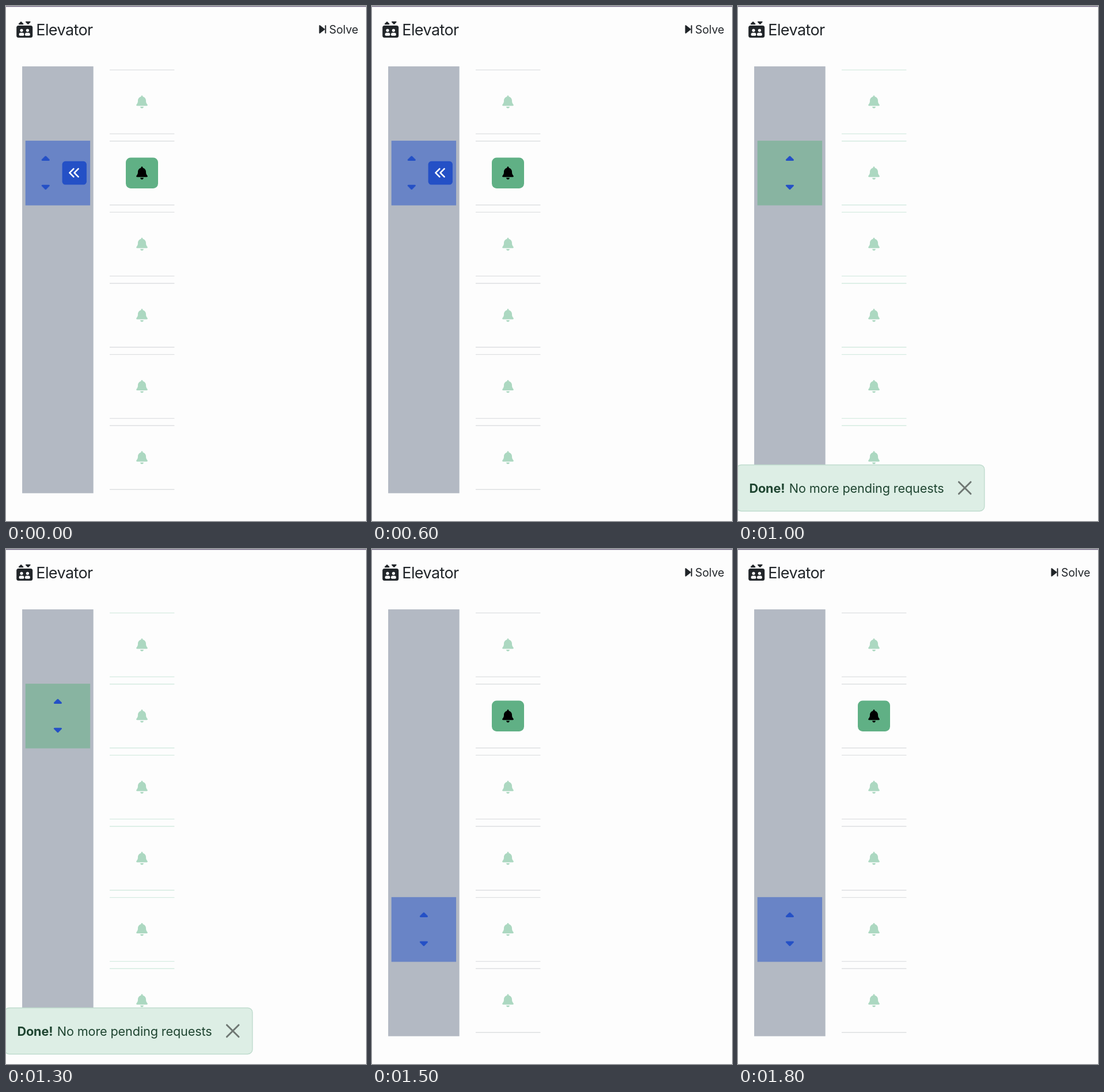
Write an HTML page that moves like this. It is 625x895 px and loops after 2000 ms.

```html
<!DOCTYPE html>
<html lang="en">
<head>
<meta charset="utf-8">
<title>Elevator</title>
<style>
html, body { margin: 0; width: 100%; height: 100%; overflow: hidden; background: #fdfdfd; }
svg { display: block; width: 625px; height: 895px; }
text { font-family: Inter, "Open Sans", sans-serif; fill: #212529; }

.car, .cab, .carets, .edge, .waiting, .opened, .done {
  animation: 2s step-end infinite;
}
.car { animation-name: travel; }
.cab { animation-name: tint; }
.carets { animation-name: center; }
.edge { animation-name: edge; }
.waiting { animation-name: waiting; }
.opened { animation-name: opened; }
.done { animation-name: done; }

@keyframes travel {
  0% { transform: none; }
  75%, 100% { transform: translateY(370.9px); }
}
@keyframes tint {
  0%, 75%, 100% { fill: #6984c6; }
  50% { fill: #88b4a1; }
}
@keyframes center {
  0% { transform: translateX(68.7px); }
  50%, 100% { transform: translateX(89.9px); }
}
@keyframes edge {
  0%, 75%, 100% { stroke: #dee0e2; }
  50% { stroke: #d5ebe1; }
}
@keyframes waiting {
  0%, 75%, 100% { visibility: visible; }
  50% { visibility: hidden; }
}
@keyframes opened {
  0% { visibility: visible; }
  50%, 100% { visibility: hidden; }
}
@keyframes done {
  0%, 75%, 100% { visibility: hidden; }
  50% { visibility: visible; }
}
</style>
</head>
<body>
<svg viewBox="0 0 625 895">
  <defs>
    <path id="bell" d="M0-11.2c-.8 0-1.4.6-1.4 1.4V-9C-4.6-8.3-7-5.5-7-2.1v.8c0 2.1-.8 4-2.1 5.6l-.4.4C-10.3 5.7-9.6 7-8.4 7H8.4C9.6 7 10.3 5.7 9.5 4.7l-.4-.4C7.8 2.7 7 .8 7-1.3v-.8C7-5.5 4.6-8.3 1.4-9v-.8c0-.8-.6-1.4-1.4-1.4zM-2.8 8.4a2.8 2.8 0 0 0 5.6 0z"/>
    <path id="caret" d="M-1-3.8Q0-4.7 1-3.8L6.6 1.8C7.5 2.7 6.9 4.2 5.6 4.2H-5.6C-6.9 4.2-7.5 2.7-6.6 1.8z"/>
    <g id="floor">
      <path class="edge" d="M180 111.1h112.4M180 222.1h112.4" stroke-width="1.4"/>
      <use href="#bell" x="236" y="166.6" fill="#acd8c1"/>
    </g>
    <g id="rider" fill="#fdfdfd">
      <circle cy="42.3" r="2.6"/>
      <path d="M-4.4 49.2a2.6 2.6 0 0 1 2.6-2.6h3.6a2.6 2.6 0 0 1 2.6 2.6v.7a1.8 1.8 0 0 1-1.8 1.8h-5.2a1.8 1.8 0 0 1-1.8-1.8z"/>
    </g>
  </defs>

  <rect width="625" height="1.4" fill="#6f6480"/>

  <g fill="#212529">
    <rect x="18.2" y="34" width="28" height="21" rx="3.5"/>
    <use href="#caret" transform="translate(26.1 29.6) scale(.62)"/>
    <use href="#caret" transform="translate(38.3 29.4) scale(.62 -.62)"/>
  </g>
  <use href="#rider" x="27"/>
  <use href="#rider" x="37.4"/>
  <text x="52.3" y="51.3" font-size="27" letter-spacing="-.6">Elevator</text>

  <g class="waiting">
    <path d="M544.6 34.2V46.8L552.6 40.5zM554.7 34.2v12.6" fill="#212529" stroke="#212529" stroke-width="2" stroke-linecap="round" stroke-linejoin="round"/>
    <text x="561" y="47.8" font-size="19.5" letter-spacing="-.1">Solve</text>
  </g>

  <rect x="28.1" y="104.9" width="123.6" height="741.8" fill="#b3b9c3"/>
  <g id="floors"></g>

  <g class="waiting">
    <rect x="208" y="263.6" width="56" height="53.4" rx="8.4" fill="#60b085"/>
    <use href="#bell" x="236" y="290.2"/>
  </g>

  <g class="car">
    <rect class="cab" x="33.7" y="234.1" width="112.4" height="112.4"/>
    <g class="carets" fill="#2450c6">
      <use href="#caret" y="264.8"/>
      <use href="#caret" transform="translate(0 314.9) scale(1 -1)"/>
    </g>
    <g class="opened">
      <rect x="97.6" y="269.8" width="42.3" height="40.8" rx="5.4" fill="#2450c6"/>
      <path d="M117.4 282.9l-7 7 7 7M125.6 282.9l-7 7 7 7" fill="none" stroke="#fff" stroke-width="2.6" stroke-linecap="round" stroke-linejoin="round"/>
    </g>
  </g>

  <g class="done">
    <rect x="-2.5" y="797.5" width="430.3" height="80.2" rx="8" fill="#ddeee5" stroke="#bedbcd" stroke-width="1.4"/>
    <text y="846" font-size="21.7" letter-spacing="-.15" style="fill:#1f4531"><tspan x="19.4" font-weight="700">Done!</tspan> <tspan x="88.7">No more pending requests</tspan></text>
    <path d="M383.4 827.2l20.6 20.6m0-20.6l-20.6 20.6" stroke="#6f7773" stroke-width="3" stroke-linecap="round"/>
  </g>
</svg>
<script>
const floorHeight = 123.63;
const floors = document.getElementById("floors");
const floor = document.getElementById("floor");
for (let i = 0; i < 6; i++) {
  const copy = floor.cloneNode(true);
  copy.removeAttribute("id");
  copy.setAttribute("transform", `translate(0 ${i * floorHeight})`);
  floors.append(copy);
}
</script>
</body>
</html>
```
